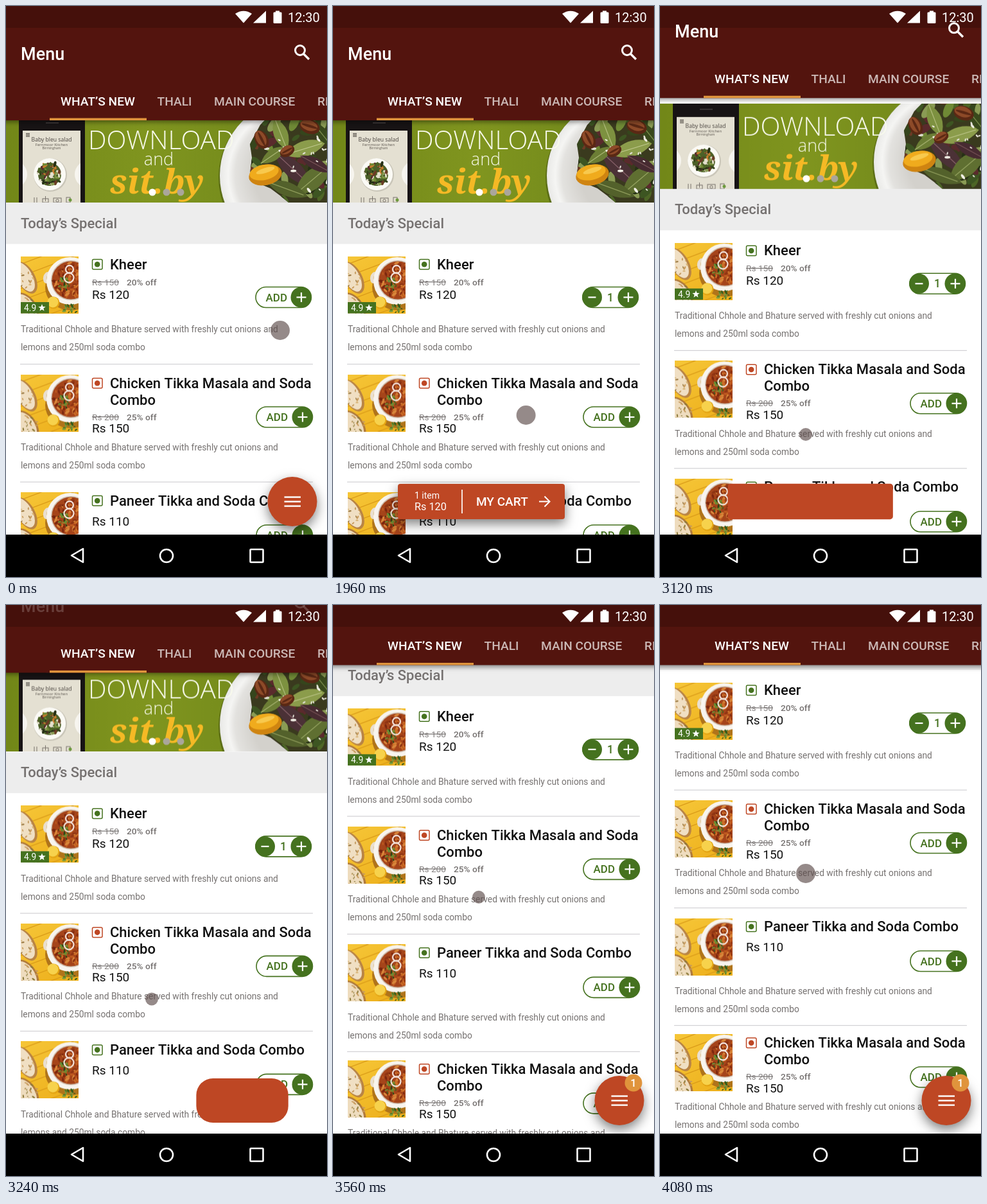
These frames come from a looping animation (500x889 px, 4.88 s). An HTML page with a canvas:

```html
<!DOCTYPE html>
<html lang="en">
<head>
<meta charset="utf-8">
<title>Menu</title>
<style>
html, body { margin: 0; width: 100%; height: 100%; overflow: hidden; background: #fff; }
canvas { display: block; width: 500px; height: 889px; }
</style>
</head>
<body>
<canvas id="stage" width="500" height="889"></canvas>
<script>
const LOOP = 4880, STEP = 40;
const GREEN = '#45721f', RED = '#be4724', GRAY = '#757170', ORANGE = '#e0943c';
const ROBOTO = 'Roboto, sans-serif';
const main = document.getElementById('stage').getContext('2d');
let c = main;

const lerp = (a, b, p) => a + (b - a) * p;
const clamp = v => Math.max(0, Math.min(1, v));
const ramp = (t, a, b) => clamp((t - a) / (b - a));

// Cubic ease with flat ends and handles at x1 and x2.
function ease(u, x1 = .33, x2 = .36) {
  let lo = 0, hi = 1;
  for (let i = 0; i < 24; i++) {
    const s = (lo + hi) / 2, q = 1 - s;
    if (3 * q * q * s * x1 + 3 * q * s * s * x2 + s * s * s < u) lo = s; else hi = s;
  }
  return lo * lo * (3 - 2 * lo);
}
const move = (t, a, b, x1, x2) => ease(ramp(t, a, b), x1, x2);
function bezier(p, a, b, d, e) {
  const q = 1 - p;
  return q * q * q * a + 3 * q * q * p * b + 3 * q * p * p * d + p * p * p * e;
}

function random(seed) {
  return () => (seed = seed * 16807 % 2147483647) / 2147483647;
}

function text(str, x, y, size, color, weight = 400, align = 'left', family = ROBOTO) {
  c.font = `${weight} ${size}px ${family}`;
  c.textAlign = align;
  c.fillStyle = color;
  c.fillText(str, x, y);
}
function rect(x, y, w, h, color) { c.fillStyle = color; c.fillRect(x, y, w, h); }
function round(x, y, w, h, r) { c.beginPath(); c.roundRect(x, y, w, h, r); }
function fill(color) { c.fillStyle = color; c.fill(); }
function stroke(color, width) { c.strokeStyle = color; c.lineWidth = width; c.stroke(); }
function path(...pts) {
  c.beginPath();
  for (let i = 0; i < pts.length; i += 2) c.lineTo(pts[i], pts[i + 1]);
}
function disc(x, y, r, color) { ellipse(x, y, r, r, 0, color); }
function ellipse(x, y, rx, ry, turn, color) {
  c.beginPath(); c.ellipse(x, y, rx, ry, turn, 0, 7); fill(color);
}
function ring(x, y, r, color, width) {
  c.beginPath(); c.arc(x, y, r, 0, 7); stroke(color, width);
}
function leaf(x, y, len, wide, turn, color, vein) {
  c.save();
  c.translate(x, y); c.rotate(turn);
  c.beginPath(); c.moveTo(-len, 0);
  c.quadraticCurveTo(0, -wide * 2, len, 0);
  c.quadraticCurveTo(0, wide * 2, -len, 0);
  fill(color);
  path(-len, 0, len * .8, 0); stroke(vein, 1.2);
  c.restore();
}
function fade(alpha, draw) {
  if (alpha <= 0) return;
  c.save(); c.globalAlpha *= alpha; draw(); c.restore();
}
function sprite(w, h, draw) {
  const canvas = document.createElement('canvas');
  canvas.width = w; canvas.height = h;
  c = canvas.getContext('2d');
  draw();
  c = main;
  return canvas;
}
function scatter(x, y, r, n, size, colors, seed) {
  const rnd = random(seed);
  for (let i = 0; i < n; i++) {
    const a = rnd() * 6.283, d = r * Math.sqrt(rnd()), s = size * (.4 + rnd() * .6);
    ellipse(x + d * Math.cos(a), y + d * Math.sin(a), s, s * .45, rnd() * 3.14, colors[Math.floor(rnd() * colors.length)]);
  }
}
function pecan(x, y, size, turn) {
  ellipse(x, y, size, size * .68, turn, '#5a2814');
  ellipse(x - 1, y - 2, size * .85, size * .5, turn, '#8d4a28');
  ellipse(x, y - 1, size * .8, size * .13, turn, '#5a2814');
}

const LEAVES = ['#35451c', '#4d6526', '#6f8a35', '#263015', '#5a2a2c', '#8a9b54', '#6b3b25', '#3d5522'];

function phone() {
  round(20, 165, 103, 160, 8); fill('#171314');
  rect(62, 181, 20, 2, '#3a3536');
  rect(26, 194, 90, 112, '#e4e0d2');
  for (let i = 0; i < 3; i++) rect(31, 198 + i * 2.2, 6, 1.2, '#55504a');
  const sans = '"Open Sans", sans-serif';
  text('Baby bleu salad', 71, 211, 8.6, '#4b4540', 400, 'center', sans);
  text('Fernmoor Kitchen', 71, 217.5, 6, '#5b544e', 400, 'center', sans);
  text('Birmingham', 71, 223, 5, '#5b544e', 400, 'center', sans);
  c.save();
  c.beginPath(); c.rect(26, 194, 90, 112); c.clip();
  disc(12, 262, 21, '#f7f5ef'); disc(128, 262, 21, '#f7f5ef');
  disc(69, 263, 26, '#c9c5b8'); disc(68, 262, 25, '#fbfaf5');
  disc(68, 262, 18, '#4d6028');
  scatter(68, 262, 18, 70, 5, [...LEAVES, '#e5dfcd', '#c77b2c'], 31);
  c.restore();
  path(44, 298, 44, 306); stroke('#77716a', 1);
  path(48, 298, 48, 306); stroke('#77716a', 1);
  c.strokeRect(57, 300, 9, 6);
  path(61.5, 304, 61.5, 296); c.stroke();
  c.strokeRect(74, 299, 12, 7); ring(80, 303, 2.2, '#77716a', 1);
  c.strokeRect(94, 298, 6, 8); disc(100, 302, 2.5, '#6c9a3c');
}

function salad() {
  disc(452, 267, 121, 'rgba(40,50,10,.35)');
  const plate = c.createRadialGradient(456, 262, 70, 452, 264, 119);
  plate.addColorStop(0, '#d3d1cc'); plate.addColorStop(.55, '#e3e2df');
  plate.addColorStop(.75, '#f5f5f3'); plate.addColorStop(1, '#e9e9e7');
  disc(452, 264, 119, plate);
  c.save();
  path(379, 270, 383, 236, 380, 215, 396, 185, 408, 173, 500, 173, 500, 306, 440, 306, 428, 296, 412, 284);
  c.closePath(); c.clip();
  rect(360, 173, 140, 133, '#3a3a1e');
  scatter(445, 235, 80, 60, 16, LEAVES, 77);
  leaf(428, 199, 27, 11, 1.2, '#7d9140', '#b4bf7e');
  leaf(466, 222, 34, 12, -.3, '#8b9c4b', '#c0c98e');
  leaf(447, 254, 40, 13, .75, '#4b3136', '#866068');
  leaf(478, 270, 36, 15, -.7, '#5f6f31', '#97a562');
  leaf(438, 285, 34, 11, .35, '#53612b', '#8f9c5b');
  leaf(482, 246, 27, 9, .5, '#472b31', '#7a5558');
  leaf(416, 232, 23, 9, -.6, '#6c7e35', '#a9b573');
  leaf(492, 199, 24, 9, .9, '#39491c', '#7f9150');
  scatter(456, 240, 58, 24, 5, ['#f2f0e6', '#e4e3d8'], 12);
  c.restore();
  pecan(398, 208, 15, 1.1);
  pecan(473, 188, 16, .3);
  pecan(438, 226, 12, -.5);
  ellipse(404, 263, 26, 16, -.2, '#cf8411');
  ellipse(402, 259, 23, 12, -.2, '#f0ab1d');
  ellipse(404, 256, 15, 4, -.3, '#f8c94d');
}

const banner = sprite(500, 133, () => {
  c.translate(0, -173);
  const g = c.createLinearGradient(0, 0, 500, 0);
  g.addColorStop(0, '#728718'); g.addColorStop(.45, '#80951f'); g.addColorStop(1, '#6b8319');
  rect(0, 173, 500, 133, g);
  phone();
  salad();
  text('DOWNLOAD', 128, 223, 40.5, '#f8faec', 300, 'left', '"Open Sans", sans-serif');
  text('and', 238, 248, 27, '#f8faec', 300, 'center', '"Open Sans", sans-serif');
  text('sit.by', 235, 292, 53, '#f5b925', 'italic 800', 'center', '"Noto Serif", serif');
  disc(228, 290, 5.5, '#fff');
  disc(250, 290, 5.5, '#aaa69b'); disc(272, 290, 5.5, '#aaa69b');
});

const dish = sprite(90, 89, () => {
  const wood = c.createLinearGradient(0, 0, 60, 89);
  wood.addColorStop(0, '#f6c637'); wood.addColorStop(1, '#eeb21f');
  rect(0, 0, 90, 89, wood);
  for (let i = 0; i < 6; i++) {
    path(0, 12 + i * 19, 90, i * 19 - 22); stroke('#d99a18', 1.3);
  }
  ellipse(8, 33, 14, 27, -.5, '#b98444'); ellipse(6, 32, 12, 25, -.5, '#f0dfc3');
  ellipse(9, 79, 26, 15, .95, '#b07a3b'); ellipse(8, 79, 23, 13, .95, '#eedcbe');
  scatter(7, 34, 15, 18, 3, ['#c79a5c', '#d9b67b', '#9b7a42'], 5);
  scatter(10, 76, 16, 20, 3, ['#c79a5c', '#8c7a3a'], 8);
  ellipse(78, 48, 40, 36, 0, '#b0741a');
  ellipse(41, 33, 6, 9, .2, '#e9dfd0'); ellipse(43, 33, 3, 5, .2, '#c58f2a');
  disc(77, 38, 37, '#f8f4ee');
  disc(78, 37, 31, '#cdbbaa');
  disc(78, 37, 29.5, '#a5441a');
  scatter(78, 37, 27, 130, 4.5, ['#bf5a20', '#7a260e', '#d8863a', '#8f3513', '#cc6d26'], 19);
  scatter(67, 42, 11, 20, 4, ['#3f6420', '#6c8c32', '#2c4717'], 40);
  ring(76, 20, 6, '#f3e1d8', 2.3); ring(75, 33, 7.5, '#f3e1d8', 2.3);
  disc(51, 72, 9.5, '#e3a312'); disc(50, 71, 8.5, '#f7d24c');
  scatter(77, 84, 10, 18, 4, ['#4f7a26', '#7d9c3b', '#35591a'], 23);
});

const LONG = ['Chicken Tikka Masala and Soda', 'Combo'];
const rows = [
  { top: 390, title: 409.5, names: ['Kheer'], was: 150, off: 20, deal: 434.5, cost: 120, price: 455.5, add: 453.5, note: 508.3, rule: 557.5, veg: true },
  { top: 573.5, title: 594.5, names: LONG, was: 200, off: 25, deal: 644.5, cost: 150, price: 664, add: 640, note: 691.8, rule: 741, veg: false },
  { top: 757, title: 777.5, names: ['Paneer Tikka and Soda Combo'], cost: 110, price: 808.5, add: 824, note: 875.3, rule: 924, veg: true },
  { top: 937.5, title: 958.5, names: LONG, was: 200, off: 25, deal: 1008.5, cost: 150, price: 1028, add: 1004.5, note: 1055.5, rule: 1106, veg: false }
];

function sign(x, y, r, plus) {
  path(x - r, y, x + r, y); stroke('#fff', 2.2);
  if (plus) { path(x, y - r, x, y + r); c.stroke(); }
}

function addButton(y, first, counted) {
  const x = first ? 389 : 390, w = first ? 86.5 : 87.5;
  round(x, y - 16, w, 32, 16); fill('#fff'); stroke(GREEN, 1.6);
  fade(1 - counted, () => text('ADD', x + 15.5, y + 6, 17, GREEN, 500));
  fade(counted, () => {
    const mx = lerp(460, 403.5, counted);
    text('1', 432, y + 6.2, 17.5, GREEN, 500, 'center');
    disc(mx, y, 15.5, GREEN);
    sign(mx, y, 6, false);
  });
  disc(x + w - 16, y, 16, GREEN);
  sign(x + w - 15.5, y, 7.5, true);
}

function star(x, y, r) {
  c.beginPath();
  for (let i = 0; i < 10; i++) {
    const a = i * Math.PI / 5 - Math.PI / 2, d = i % 2 ? r * .42 : r;
    c.lineTo(x + d * Math.cos(a), y + d * Math.sin(a));
  }
  fill('#fff');
}

function row(r, first, counted) {
  const mark = r.veg ? GREEN : RED, my = r.title - 7.5;
  c.drawImage(dish, 23, r.top);
  if (first) {
    rect(23, 461, 44, 17.5, GREEN);
    text('4.9', 28, 474.8, 13.8, '#fff');
    star(56, 470, 6);
  }
  round(134.5, my - 7.5, 15.5, 15.5, 2); stroke(mark, 1.5);
  disc(142.2, my + .2, 4.3, mark);
  r.names.forEach((name, i) => text(name, 162, r.title + i * 26, 22, '#111', 500));
  if (r.was) {
    text('Rs ' + r.was, 134, r.deal, 13.7, '#858180');
    rect(134, r.deal - 5.5, 42, 1.2, '#757170');
    text(r.off + '% off', 188, r.deal, 13.7, GRAY, 500);
  }
  text('Rs ' + r.cost, 134, r.price, 19, '#111');
  addButton(r.add, first, counted);
  text('Traditional Chhole and Bhature served with freshly cut onions and', 23, r.note, 13.8, GRAY);
  text('lemons and 250ml soda combo', 23, r.note + 28, 13.8, GRAY);
  rect(22, r.rule - .5, 456, 1.2, '#d2d1d4');
}

function header(shift) {
  const bottom = 178 - shift;
  c.save();
  c.shadowColor = 'rgba(0,0,0,.5)'; c.shadowBlur = 8; c.shadowOffsetY = 2;
  rect(-20, -20, 540, bottom + 20, '#53140e');
  c.restore();
  rect(0, 0, 500, 34, '#45100b');
  fade(1 - ramp(shift, 42, 80), () => {
    text('Menu', 23, 83.5 - shift, 27, '#fff', 500);
    ring(458, 69 - shift, 7.5, '#fff', 3);
    path(463.5, 74.5 - shift, 472, 83 - shift); stroke('#fff', 3.4);
  });
  const y = 154.7 - shift;
  text('WHAT’S NEW', 85, y, 19.2, '#fff', 500);
  [['THALI', 235.5], ['MAIN COURSE', 324], ['RICE', 485]].forEach(([s, x]) => text(s, x, y, 19.2, '#cbb8b5', 500));
  rect(68, bottom - 3.5, 151, 3.5, ORANGE);

  c.beginPath(); c.moveTo(370, 26.5); c.lineTo(357, 12); c.quadraticCurveTo(370, 3.5, 383, 12); fill('#fff');
  path(385, 26.5, 405, 26.5, 405, 7.5); fill('#fff');
  round(416.5, 9.5, 13, 17.5, 1.5); fill('#fff');
  rect(420, 7.5, 6, 3, '#fff');
  text('12:30', 439, 25, 20, '#fff');
}

function cart(t) {
  const opening = t < 2400;
  const p = opening ? move(t, 1580, 1820) : 1 - move(t, 3094, 3350, .5, .5);
  const label = opening ? ramp(t, 1720, 1840) : 1 - ramp(t, 3000, 3100);
  const icon = opening ? 1 - ramp(t, 1540, 1620) : ramp(t, 3280, 3380);
  c.save();
  c.shadowColor = `rgba(0,0,0,${.5 * Math.max(label, icon)})`;
  c.shadowBlur = 18; c.shadowOffsetY = 7;
  round(lerp(407.5, 101, p), lerp(733, 744, p), lerp(77, 260, p), lerp(77, 55, p), lerp(38.5, 4, p));
  fill(RED);
  c.restore();
  fade(icon, () => {
    for (let i = -1; i < 2; i++) rect(433.5, 770.4 + i * 7, 25.5, 2.4, '#fff');
  });
  fade(label, () => {
    text('1 item', 127, 767.3, 14, '#fff');
    text('Rs 120', 127, 785, 16.3, '#fff');
    rect(200, 753, 2, 37, '#f6e3dc');
    text('MY CART', 223, 778, 19, '#fff', 500);
    path(321, 771.5, 337, 771.5); stroke('#fff', 2);
    path(329.5, 763.5, 337.5, 771.5, 329.5, 779.5); c.stroke();
  });
  if (opening) return;
  fade(ramp(t, 3300, 3420), () => disc(468, 744, lerp(15, 13.5, ramp(t, 3400, 3480)), ORANGE));
  fade(ramp(t, 3380, 3500), () => text('1', 468, 750, 16.5, '#fff', 500, 'center'));
}

function navBar() {
  rect(0, 823, 500, 66, '#000');
  c.lineJoin = 'round';
  path(102, 855.5, 120, 845, 120, 866); c.closePath(); stroke('#fff', 2.6);
  ring(250, 856, 10, '#fff', 2.6);
  round(380.5, 846, 20, 20, 1); stroke('#fff', 2.6);
  c.lineJoin = 'miter';
}

function pointer(t) {
  let x, y;
  if (t < 1580) {
    const p = move(t, 1280, 1520);
    x = lerp(427, 460, p); y = lerp(505, 453, p);
  } else if (t < 2440) {
    const p = move(t, 1599, 2359);
    x = bezier(p, 460, 398, 292, 216);
    y = bezier(p, 453, 500, 690, 688);
  } else {
    x = lerp(216, 227, move(t, 2480, 2900));
    y = lerp(688, 418, move(t, 2992, 3804, .33, .5));
  }
  const tap = ramp(t, 1480, 1540) * (1 - ramp(t, 1580, 1660));
  const drag = move(t, 2680, 2900) * (1 - move(t, 3800, 4060));
  disc(x, y, 15 - 5 * Math.max(tap, drag), 'rgba(92,76,74,.65)');
}

function draw(t) {
  const scroll = 269.5 * move(t, 2983, 3906);
  const counted = move(t, 1560, 1720);
  rect(0, 0, 500, 889, '#fff');
  c.save();
  c.translate(0, -scroll);
  c.drawImage(banner, 0, 173);
  rect(0, 306, 500, 64.5, '#ededed');
  text('Today’s Special', 23, 345.5, 22, '#757170', 500);
  rows.forEach((r, i) => row(r, i === 0, i ? 0 : counted));
  c.restore();
  header(84.5 * move(t, 2983, 3387));
  cart(t);
  navBar();
  pointer(t);
}

function tick() {
  const t = performance.now() % LOOP;
  draw(t - t % STEP);
  requestAnimationFrame(tick);
}
tick();
</script>
</body>
</html>
```
